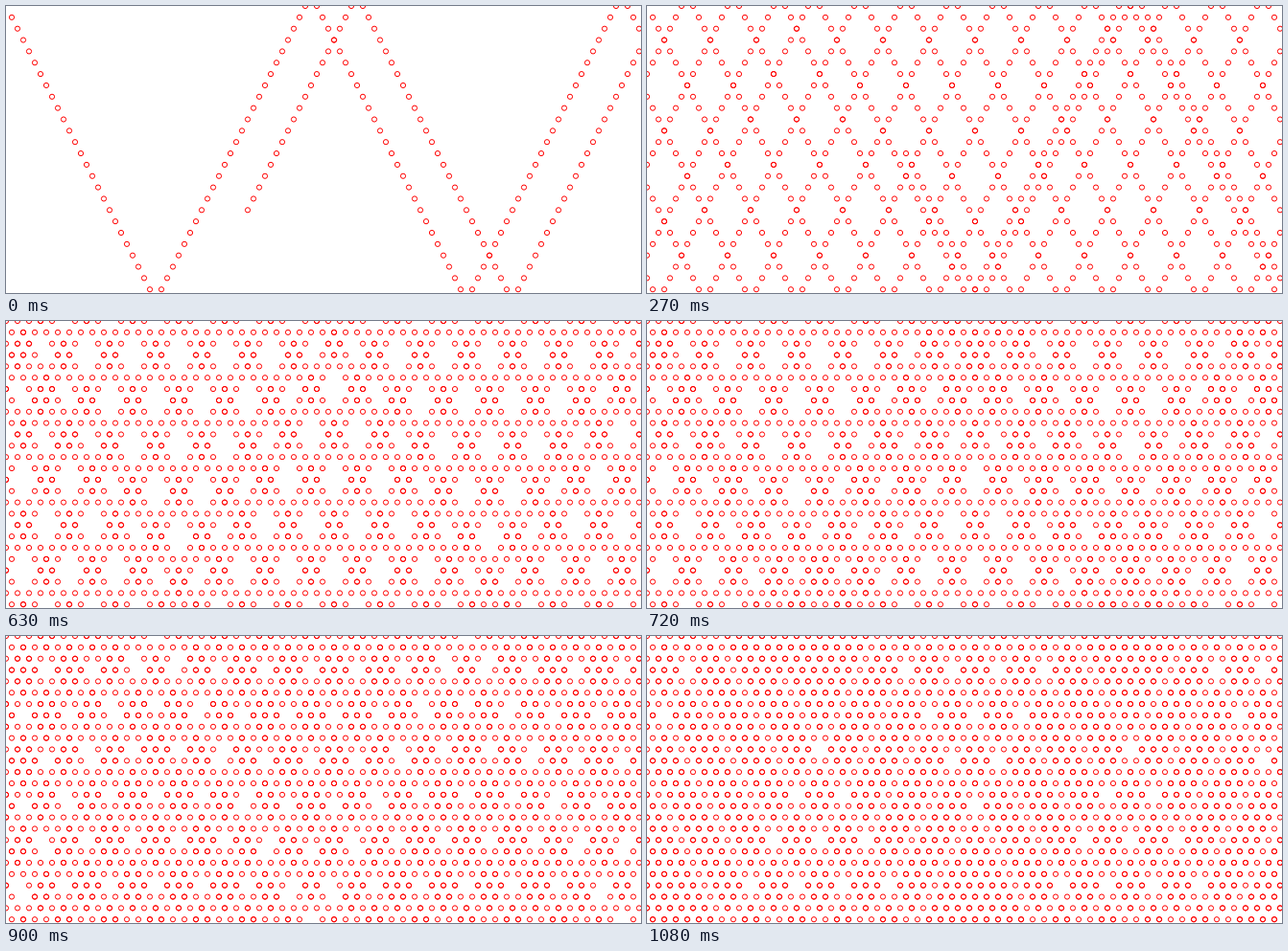
Recreate the animation shown at these times as an HTML page with a canvas. Size 662x300 px, loop 1170 ms.

```html
<!DOCTYPE html>
<html lang="en">
<head>
<meta charset="utf-8">
<title>Bouncing trail</title>
<style>
  html, body { margin: 0; width: 100%; height: 100%; overflow: hidden; background: #fff; }
  canvas { display: block; }
</style>
</head>
<body>
<canvas id="stage" width="662" height="300"></canvas>
<script>
const ctx = document.getElementById('stage').getContext('2d');
const STEP_MS = 90, STEPS = 13;
const COLS = 112, ROWS = 27;   // walls lie one cell outside the stage
const DX = 6, DY = 11.85, RADIUS = 2.6;

// Triangle wave: position after n cells, bouncing between 0 and size.
const bounce = (n, size) => size - Math.abs(size - n % (2 * size));

// Cells travelled by the end of each step.
const travelled = step => step === 0 ? 181 : 304 + 182 * step;

function draw(step) {
  ctx.fillStyle = '#fff';
  ctx.fillRect(0, 0, 662, 300);
  ctx.strokeStyle = '#f00';
  ctx.lineWidth = 1;
  const end = travelled(step);
  for (let n = 2; n <= end; n++) {
    const x = (bounce(n, COLS) - 1) * DX;
    const y = (bounce(n, ROWS) - 1) * DY;
    ctx.beginPath();
    ctx.arc(x, y, RADIUS, 0, 2 * Math.PI);
    ctx.stroke();
  }
}

let shown = 0;
const start = performance.now();

function tick() {
  const elapsed = Math.max(0, performance.now() - start);
  const step = Math.floor(elapsed / STEP_MS) % STEPS;
  if (step !== shown) draw(shown = step);
  requestAnimationFrame(tick);
}

draw(0);
requestAnimationFrame(tick);
</script>
</body>
</html>
```
